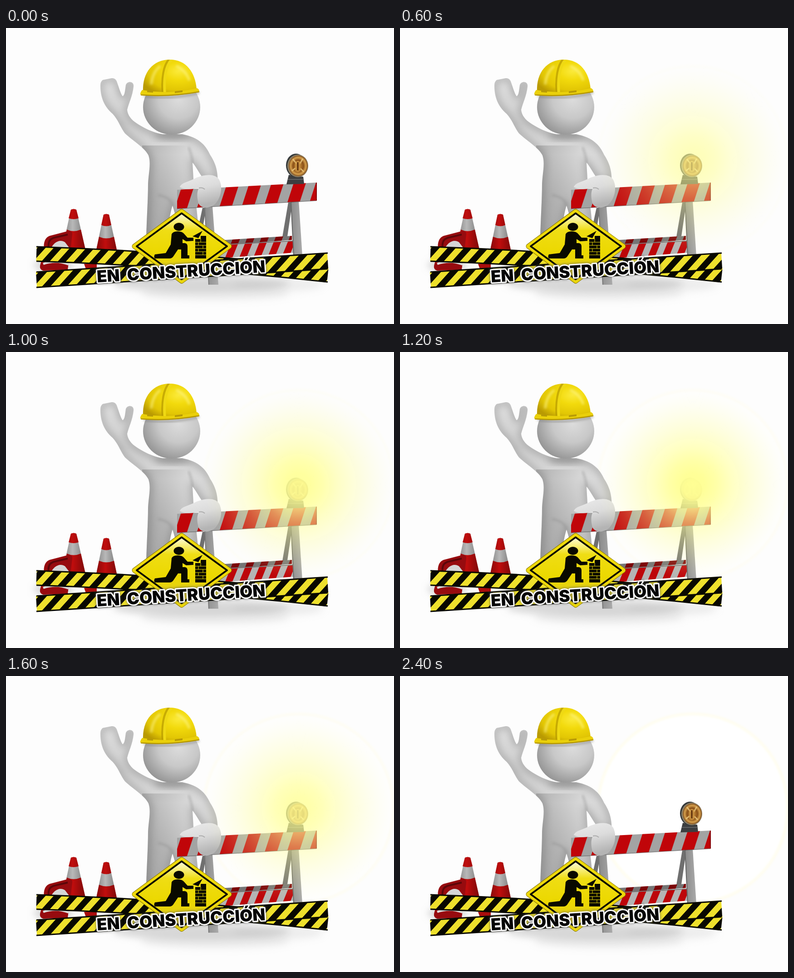
Recreate the animation shown at these times as an HTML page. Size 855x655 px, loop 2600 ms.

```html
<!DOCTYPE html>
<html lang="es">
<head>
<meta charset="utf-8">
<title>En construcción</title>
<style>
html, body { margin: 0; width: 100%; height: 100%; overflow: hidden; background: #fdfdfd; }
svg { display: block; width: 100%; height: 100%; }
text { font: 900 36.5px Inter, "DejaVu Sans", sans-serif; word-spacing: 9px; }
</style>
</head>
<body>
<svg viewBox="0 0 855 655">
<defs>
  <filter id="soft" x="-30%" y="-30%" width="160%" height="160%"><feGaussianBlur stdDeviation="8"/></filter>
  <filter id="fine" x="-30%" y="-30%" width="160%" height="160%"><feGaussianBlur stdDeviation="2.5"/></filter>
  <radialGradient id="headFill" cx=".62" cy=".36" r=".7">
    <stop offset="0" stop-color="#dcdcdc"/><stop offset=".5" stop-color="#c8c8c8"/><stop offset="1" stop-color="#929292"/>
  </radialGradient>
  <linearGradient id="bodyFill" x1="0" y1="110" x2="0" y2="450" gradientUnits="userSpaceOnUse">
    <stop offset="0" stop-color="#e0e0e0"/><stop offset=".3" stop-color="#cdcdcd"/><stop offset=".5" stop-color="#dadada"/>
    <stop offset=".75" stop-color="#c8c8c8"/><stop offset="1" stop-color="#c0c0c0"/>
  </linearGradient>
  <linearGradient id="sideShade" x1="305" y1="0" x2="405" y2="0" gradientUnits="userSpaceOnUse">
    <stop offset="0" stop-opacity=".17"/><stop offset="1" stop-opacity="0"/>
  </linearGradient>
  <linearGradient id="handFill" x2=".3" y2="1">
    <stop offset="0" stop-color="#ececec"/><stop offset=".5" stop-color="#dcdcdc"/><stop offset="1" stop-color="#b4b4b4"/>
  </linearGradient>
  <radialGradient id="hatFill" cx=".66" cy=".34" r=".75">
    <stop offset="0" stop-color="#fbea3a"/><stop offset=".35" stop-color="#f2da0c"/><stop offset=".75" stop-color="#e2c604"/><stop offset="1" stop-color="#b99a02"/>
  </radialGradient>
  <radialGradient id="lens">
    <stop offset="0" stop-color="#6e3a10"/><stop offset=".3" stop-color="#b0752c"/><stop offset=".55" stop-color="#8a5018"/>
    <stop offset=".8" stop-color="#d6a04c"/><stop offset="1" stop-color="#805020"/>
  </radialGradient>
  <linearGradient id="signFill" x2="0" y2="1">
    <stop offset="0" stop-color="#fffce0"/><stop offset=".12" stop-color="#f8ef80"/><stop offset=".26" stop-color="#efdd14"/>
    <stop offset=".6" stop-color="#ecd800"/><stop offset="1" stop-color="#dfca28"/>
  </linearGradient>
  <linearGradient id="steel"><stop offset="0" stop-color="#8b8b8b"/><stop offset="1" stop-color="#aaa"/></linearGradient>
  <linearGradient id="coneShade"><stop offset="0" stop-opacity=".3"/><stop offset=".45" stop-opacity="0"/><stop offset="1" stop-opacity=".35"/></linearGradient>
  <radialGradient id="glowFill">
    <stop offset="0" stop-color="#ffff94"/><stop offset=".12" stop-color="#ffff95" stop-opacity=".97"/>
    <stop offset=".25" stop-color="#ffff96" stop-opacity=".83"/><stop offset=".4" stop-color="#ffff98" stop-opacity=".6"/>
    <stop offset=".6" stop-color="#ffff9c" stop-opacity=".36"/><stop offset=".8" stop-color="#ffffa4" stop-opacity=".16"/>
    <stop offset="1" stop-color="#ffffc0" stop-opacity="0"/>
  </radialGradient>
  <pattern id="plank" width="48.8" height="200" patternUnits="userSpaceOnUse" patternTransform="translate(471 394) skewX(-18)">
    <rect width="49" height="200" fill="#a3a3a3"/><rect width="27" height="200" fill="#c00509"/>
  </pattern>
  <pattern id="rail" width="31" height="200" patternUnits="userSpaceOnUse" patternTransform="translate(483 508) skewX(-22)">
    <rect width="31" height="200" fill="#b4b4b4"/><rect width="16" height="200" fill="#bd060a"/>
  </pattern>
  <pattern id="tapeA" width="36" height="140" patternUnits="userSpaceOnUse" patternTransform="translate(75 500) skewX(-42)">
    <rect width="36" height="140" fill="#080800"/><rect width="18" height="140" fill="#eee02c"/>
  </pattern>
  <pattern id="tapeB" href="#tapeA" patternTransform="translate(75 557) skewX(-42)"/>
  <path id="body" d="M345 235C325 232 300 220 284 208C273 200 268 190 267 181C271 165 279 150 281 130C283 118 268 116 264 126C262 140 262 148 257 151C252 144 249 132 245 121Q242 110 233 111L213 115Q208 119 208 127C208 150 214 172 235 190C248 204 252 220 262 233C280 250 306 265 314 282C320 300 314 320 313 345C313 380 310 420 309 465L352 465C358 440 361 410 367 393C371 405 375 420 378 440L424 440L418 380C414 355 413 335 411 298C417 304 424 318 433 331L466 342C468 315 460 296 450 281C440 259 425 242 388 235Z"/>
  <clipPath id="bodyClip"><use href="#body"/></clipPath>
  <path id="hat" d="M302 141C300 98 324 70 361 70C397 70 417 98 420 135C400 145 340 149 302 141Z"/>
  <clipPath id="hatClip"><use href="#hat"/></clipPath>
</defs>

<g id="halo">
  <circle cx="645" cy="293" r="210" fill="#fff"/>
  <circle cx="645" cy="293" r="209" fill="none" stroke="#fffdec" stroke-width="5" filter="url(#fine)"/>
</g>

<!-- floor shadows -->
<g filter="url(#soft)" fill="#bbb">
  <ellipse cx="430" cy="566" rx="195" ry="18" opacity=".55"/>
  <ellipse cx="460" cy="588" rx="165" ry="14" opacity=".26"/>
  <ellipse cx="600" cy="568" rx="100" ry="16" opacity=".24"/>
  <ellipse cx="105" cy="525" rx="44" ry="14" opacity=".6"/>
</g>

<!-- cones -->
<path d="M143 402Q149 399 155 402L175 490H124Z" fill="#b8b8b8"/>
<path d="M143 402Q149 399 155 402L160 421Q149 425 138 421ZM134 446Q149 453 165 446L175 490H124Z" fill="#c00d0d"/>
<path d="M143 402Q149 399 155 402L175 490H124Z" fill="url(#coneShade)"/>
<path d="M215 413Q221 410 227 413L245 495H198Z" fill="#b8b8b8"/>
<path d="M215 413Q221 410 227 413L232 436Q221 441 210 436ZM205 462Q221 469 238 462L245 495H198Z" fill="#c00d0d"/>
<path d="M215 413Q221 410 227 413L245 495H198Z" fill="url(#coneShade)"/>
<path d="M172 522H200V530L176 533Z" fill="#a90d0d"/>
<path d="M84 495C82 475 85 465 96 460L138 449Q147 449 146 457L136 535L82 537Q72 534 76 522Z" fill="#970b0f"/>
<path d="M94 488C92 472 97 467 106 464L136 457" fill="none" stroke="#5c0609" stroke-width="4"/>
<path d="M98 490C104 475 118 466 130 474L143 491Z" fill="#d6d6d6"/>
<path d="M82 522Q110 512 138 523" fill="none" stroke="#ddd" stroke-width="5"/>

<!-- figure -->
<use href="#body" fill="url(#bodyFill)"/>
<g clip-path="url(#bodyClip)">
  <use href="#body" fill="none" stroke="#858585" stroke-width="12" opacity=".5" filter="url(#soft)"/>
  <path d="M300 260H420V470H300Z" fill="url(#sideShade)"/>
  <ellipse cx="366" cy="238" rx="40" ry="9" fill="#777" opacity=".55" filter="url(#soft)"/>
  <path d="M367 393C364 380 352 372 335 370" fill="none" stroke="#888" stroke-width="5" opacity=".35" filter="url(#fine)"/>
  <path d="M412 299C408 280 406 270 402 264" fill="none" stroke="#888" stroke-width="5" opacity=".35" filter="url(#fine)"/>
</g>
<ellipse cx="365" cy="175" rx="63" ry="61" fill="url(#headFill)"/>
<path d="M303 150Q362 160 426 143" fill="none" stroke="#777" stroke-width="5" opacity=".45" filter="url(#fine)"/>
<use href="#hat" fill="url(#hatFill)"/>
<g clip-path="url(#hatClip)">
  <path d="M347 145C344 110 349 82 361 70" fill="none" stroke="#b39600" stroke-width="8" opacity=".65"/>
  <path d="M350 145C347 110 353 82 365 70" fill="none" stroke="#efd914" stroke-width="6"/>
  <path d="M320 125C322 105 330 92 340 84M375 84C392 92 400 103 404 116" fill="none" stroke="#fff89a" stroke-width="6" opacity=".5" filter="url(#fine)"/>
</g>
<path d="M300 137Q361 148 421 133Q428 137 425 142Q362 154 298 149Q293 146 300 137Z" fill="#ead00a"/>
<path d="M297 148Q362 153 426 141" fill="none" stroke="#b59700" stroke-width="2.5"/>
<path d="M311 138l13 1v4l-13-1zM372 140l17-2v4l-17 2z" fill="#b89a06"/>

<!-- barrier -->
<path d="M433 398H441L434 440H424ZM622 386H631L619 468H608Z" fill="#6f6f6f"/>
<path d="M466 470L630 460V469L466 481Z" fill="url(#rail)"/>
<path d="M466 470L630 460V469L466 481Z" opacity=".35"/>
<path d="M466 480L636 471V497L466 510Z" fill="url(#rail)"/>
<path d="M466 480L636 471" stroke="#777" stroke-width="2"/>
<path d="M628 384L645 382L653 504H634Z" fill="url(#steel)"/>
<path d="M628 384L634 504" stroke="#666" stroke-width="2"/>
<path d="M438 396L455 395L468 568H447Z" fill="url(#steel)"/>
<path d="M438 396L447 568" stroke="#777" stroke-width="2"/>
<path d="M377 358L684 342V382L377 400Z" fill="url(#plank)"/>
<path d="M377 400L684 382" stroke="#555" stroke-width="1.5" opacity=".6"/>
<path d="M684 342V382" stroke="#850408" stroke-width="2"/>

<!-- lamp -->
<path d="M623 325L655 329L657 345L618 346Z" fill="#3c3e40"/>
<path d="M621 335L656 335" stroke="#606264" stroke-width="2"/>
<ellipse cx="639" cy="304" rx="22" ry="26" fill="#34383a"/>
<ellipse cx="643" cy="305" rx="23" ry="25" fill="#8d8066"/>
<ellipse cx="644" cy="305" rx="21" ry="23" fill="url(#lens)"/>
<path d="M632 290L640 300M654 289L648 300M630 316L638 310M656 318L649 311" stroke="#f0cf85" stroke-width="3" opacity=".75"/>
<path d="M637 298Q643 290 649 298V316Q643 322 637 316Z" fill="#d39c48" opacity=".7"/>
<path d="M643 297V315" stroke="#5b2d0b" stroke-width="3"/>

<!-- resting hand -->
<path d="M383 352C386 342 402 341 420 331C440 323 462 322 470 336C478 352 474 374 462 388C450 401 430 400 424 388C420 372 421 362 425 354C410 357 394 358 383 352Z" fill="url(#handFill)"/>
<path d="M425 354Q433 352 438 357" fill="none" stroke="#999" stroke-width="2" opacity=".7"/>

<circle id="glow" cx="645" cy="293" r="210" fill="url(#glowFill)"/>

<!-- tapes -->
<g fill="none">
  <path d="M67 500Q380 510 709 547" stroke="url(#tapeA)" stroke-width="32"/>
  <path d="M67 484Q380 494 709 531M67 516Q380 526 709 562" stroke="#0a0a00" stroke-width="3"/>
  <path d="M67 557L709 515" stroke="url(#tapeB)" stroke-width="35"/>
  <path d="M67 540L709 498M67 574L709 533" stroke="#0a0a00" stroke-width="3"/>
</g>

<!-- sign -->
<g stroke-linejoin="round">
  <path d="M387 406L492 483L387 560L283 483Z" fill="#bda600" stroke="#8a7900" stroke-width="11"/>
  <path d="M387 406L492 483L387 560L283 483Z" fill="#eed90a" stroke="#eed90a" stroke-width="9"/>
  <path d="M387 410L487 483L387 556L288 483Z" fill="url(#signFill)" stroke="#0b0b00" stroke-width="4"/>
</g>
<g fill="#090900">
  <ellipse cx="381" cy="440" rx="11.5" ry="9"/>
  <path d="M365 456Q368 450 378 450Q389 450 393 456L400 464L413 464V471L397 472L389 467V476H394Q400 477 400 483V503H404V510H386V490H379L369 505Q366 510 360 510H328Q325 506 328 501L352 498L363 479Z"/>
  <path d="M411 461L433 449L424 465Z"/>
  <path d="M429 460H441V510H417V467H429Z"/>
</g>
<path d="M417 474H441M417 481H441M417 488H441M417 495H441M417 502H441M429 467V474M424 474V481M434 481V488M424 488V495M434 495V502" stroke="#eedb08" stroke-width="1"/>

<!-- lettering -->
<g transform="translate(201 563) rotate(-3.5)" stroke-linejoin="round">
  <text fill="none" stroke="#555" stroke-width="9" opacity=".5" filter="url(#fine)">EN CONSTRUCCIÓN</text>
  <text fill="#050505" stroke="#fff" stroke-width="6" paint-order="stroke">EN CONSTRUCCIÓN</text>
</g>
</svg>
<script>
const glow = document.getElementById("glow");
const halo = document.getElementById("halo");
const STEP = 200, STEPS = 13, PEAK = 6;

// The lamp holds each brightness for one step: quick rise, slow peak, mirrored fall.
function draw(now) {
  const k = Math.floor(now / STEP) % STEPS;
  glow.setAttribute("opacity", 1 - Math.pow(Math.abs(k - PEAK) / PEAK, 1.5));
  halo.setAttribute("opacity", k / (STEPS - 1));
  requestAnimationFrame(draw);
}
draw(0);
</script>
</body>
</html>
```
